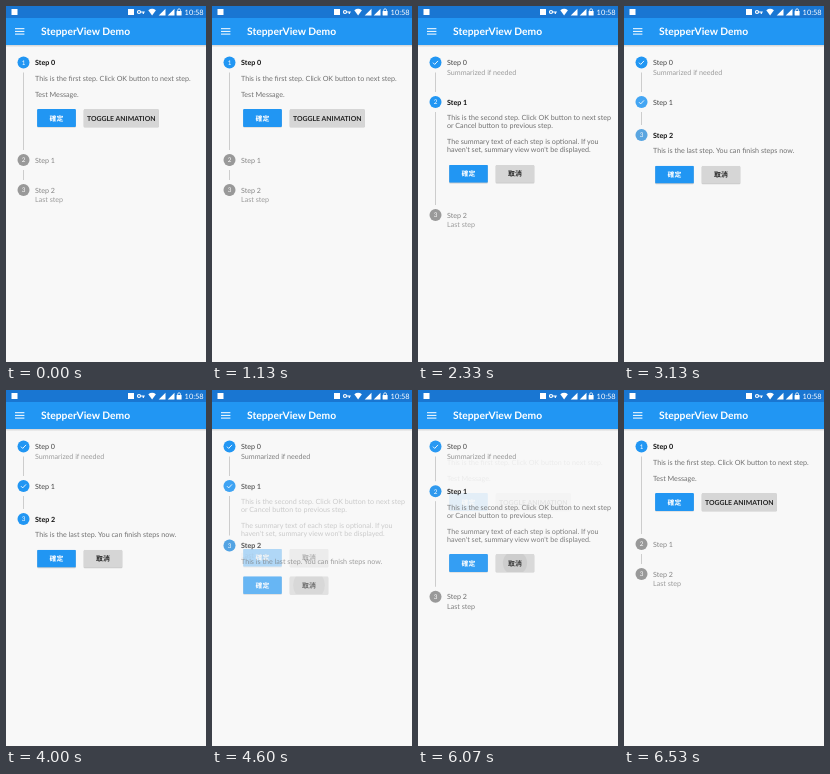
Recreate the animation shown at these times as an HTML page. Size 200 px wide and 356 px high, loop 7.06 s.

```html
<!DOCTYPE html>
<html lang="en">
<head>
<meta charset="utf-8">
<title>StepperView Demo</title>
<style>
  html, body { margin: 0; width: 100%; height: 100%; overflow: hidden; background: #f8f8f8; }
  #stage { display: block; width: 200px; height: 356px; font: 7.15px Lato, "Noto Sans CJK TC", "Noto Sans CJK JP", sans-serif; text-rendering: geometricPrecision; --soft: #9c9c9c; --pending: #868686; }
  #stage.busy { --soft: #808080; --pending: #707070; }
  .b { font-weight: 700; }
  .mid { text-anchor: middle; }
  .active { fill: #111; font-weight: 700; }
  .done { fill: #444; }
  .pending { fill: var(--pending); }
  .sub { fill: var(--soft); }
  .body { fill: #707070; }
  .num { fill: #fff; font-size: 6.4px; font-weight: 400; text-anchor: middle; }
  .check { fill: none; stroke: #fff; stroke-width: .9; }
  .line { stroke: #cdcdcd; stroke-width: 1; }
</style>
</head>
<body>
<svg id="stage" viewBox="0 0 200 356">
  <defs>
    <linearGradient id="shade" x2="0" y2="1">
      <stop stop-color="#000" stop-opacity=".15"/>
      <stop offset="1" stop-color="#000" stop-opacity="0"/>
    </linearGradient>
  </defs>
  <rect width="200" height="356" fill="#f8f8f8"/>
  <g id="steps"></g>

  <rect y="39" width="200" height="2.5" fill="url(#shade)"/>
  <rect width="200" height="39" fill="#2196f3"/>
  <rect width="200" height="12" fill="#1976d2"/>
  <path d="M9 22.7h9.400M9 25.4h9.400M9 28.1h9.400" stroke="#fff" stroke-width="1"/>
  <text class="b" x="35" y="29.2" font-size="10.3" fill="#fff">StepperView Demo</text>

  <g fill="#fff">
    <rect x="5.5" y="3" width="6" height="6"/>
    <rect x="122" y="3" width="6" height="6"/>
    <path d="M142.300 4.200Q146.100 1.400 149.900 4.200L146.100 9.500Z"/>
    <path d="M159.500 2.700v6.800h-6.800ZM168.500 2.700v6.800h-6.800Z"/>
    <rect x="170.600" y="5" width="5" height="4.600" rx=".5"/>
    <text x="178.600" y="9.100" font-size="7.400">10:58</text>
  </g>
  <g fill="none" stroke="#fff">
    <circle cx="133" cy="6" r="1.500" stroke-width="1.200"/>
    <path d="M134.600 6h4.200M137.300 6v1.900" stroke-width="1.200"/>
    <path d="M171.700 5.200v-1a1.400 1.400 0 0 1 2.800 0v1" stroke-width=".8"/>
  </g>
</svg>
<script>
// TINT is the time the numbered circles take to change
const LOOP = 7060, FRAME = 1000 / 15, MOVE = 210, TINT = 310, PRESS = 50;
const STATES = ['active', 'done', 'pending'];

// y of each step while step 0, 1 or 2 is open
const layout = [[56.5, 154, 184], [56.5, 96, 209], [56.5, 96, 129]];

// body lines are [row, text]; y of the buttons is relative to the step
const steps = [
  { sub: 'Summarized if needed', subWhen: 'done', y: 55.5, buttons: ['確定', 'TOGGLE ANIMATION'],
    body: [[0, 'This is the first step. Click OK button to next step.'], [2, 'Test Message.']] },
  { sub: '', subWhen: 'done', y: 71.8, buttons: ['確定', '取消'],
    body: [[0, 'This is the second step. Click OK button to next step'],
           [1, 'or Cancel button to previous step.'],
           [3, 'The summary text of each step is optional. If you'],
           [4, 'haven\'t set, summary view won\'t be displayed.']] },
  { sub: 'Last step', subWhen: 'pending', y: 39.6, buttons: ['確定', '取消'],
    body: [[0, 'This is the last step. You can finish steps now.']] }
];

const moves = [
  { at: 1445, from: 0, to: 1, button: 0 },
  { at: 2915, from: 1, to: 2, button: 0 },
  { at: 4518, from: 2, to: 1, button: 1 },
  { at: 6026, from: 1, to: 0, button: 1 }
];

const button = (label, i, y) => {
  const x = i ? 77.6 : 31.1, w = label.length > 2 ? 75.3 : 38.8;
  return `<rect x="${x}" y="${y - 8.2}" width="${w}" height="17.8" rx="1" opacity=".18"/>
    <svg x="${x}" y="${y - 8.9}" width="${w}" height="17.8">
      <rect width="${w}" height="17.8" rx="1" fill="${i ? '#d6d6d6' : '#2196f3'}"/>
      <circle class="ripple" cx="${w / 2}" cy="8.9" r="0" opacity=".06"/>
      <text class="b mid" x="${w / 2}" y="11.5" font-size="6.9" fill="${i ? '#222' : '#fff'}">${label}</text>
    </svg>`;
};

const badge = (state, i) => `<g class="badge">
  <circle cx="17.5" r="6" fill="${state === 'pending' ? '#999' : '#2196f3'}"/>
  ${state === 'done' ? '<path class="check" d="M15 .2l1.700 1.700 3.300-3.500"/>'
                     : `<text class="num" x="17.5" y="2.3">${i + 1}</text>`}
</g>`;

const stepMarkup = (s, i) => `<g class="step">
  <line class="line" x1="17.5" x2="17.5" y1="10"/>
  ${STATES.map(state => badge(state, i)).join('')}
  ${STATES.map(state => `<text class="title ${state}" x="29" y="2.7">Step ${i}</text>`).join('')}
  <text class="sub" x="29" y="12.3">${s.sub}</text>
  <g class="content">
    ${s.body.map(([row, text]) => `<text class="body" x="29" y="${18.4 + row * 8}">${text}</text>`).join('')}
    ${s.buttons.map((label, n) => button(label, n, s.y)).join('')}
  </g>
</g>`;

const stage = document.getElementById('stage');
const holder = document.getElementById('steps');
holder.innerHTML = steps.map(stepMarkup).join('');
const views = [...holder.children].map(el => ({
  el,
  line: el.querySelector('.line'),
  sub: el.querySelector('.sub'),
  content: el.querySelector('.content'),
  badges: el.querySelectorAll('.badge'),
  titles: el.querySelectorAll('.title'),
  ripples: el.querySelectorAll('.ripple')
}));

const clamp = v => Math.min(1, Math.max(0, v));
const ease = v => (1 - Math.cos(Math.PI * clamp(v))) / 2;
const mix = (a, b, p) => a + (b - a) * p;
const fade = (el, v) => el.setAttribute('opacity', v.toFixed(3));
const stateOf = (i, open) => i === open ? 'active' : i < open ? 'done' : 'pending';

function draw(t) {
  const move = moves.filter(m => t >= m.at - PRESS).pop() || { at: t, from: 0, to: 0, button: 0 };
  const { from, to } = move;
  const age = t - move.at;
  const p = ease(age / MOVE), tint = ease(age / TINT);
  const ys = layout[from].map((y, i) => mix(y, layout[to][i], p));

  stage.classList.toggle('busy', from !== to && age < MOVE);
  views.forEach((v, i) => {
    const weight = (state, k = p) => mix(+(stateOf(i, from) === state), +(stateOf(i, to) === state), k);
    v.el.setAttribute('transform', `translate(0 ${ys[i].toFixed(2)})`);
    STATES.forEach((state, n) => {
      fade(v.titles[n], weight(state));
      fade(v.badges[n], weight(state, tint));
    });
    fade(v.content, weight('active'));
    fade(v.sub, weight(steps[i].subWhen) ** 2);
    v.line.setAttribute('y2', i < 2 ? ys[i + 1] - ys[i] - 10 : 10);
    v.ripples.forEach((r, n) => {
      const pressed = from !== to && i === from && n === move.button && age < MOVE;
      r.setAttribute('r', pressed ? 4 + (age + PRESS) * 0.09 : 0);
    });
  });
}

const start = performance.now();
function tick() {
  const t = (performance.now() - start) % LOOP;
  // the screen refreshes fifteen times a second
  draw(Math.floor((t + 5) / FRAME) * FRAME);
  requestAnimationFrame(tick);
}
tick();
</script>
</body>
</html>
```
